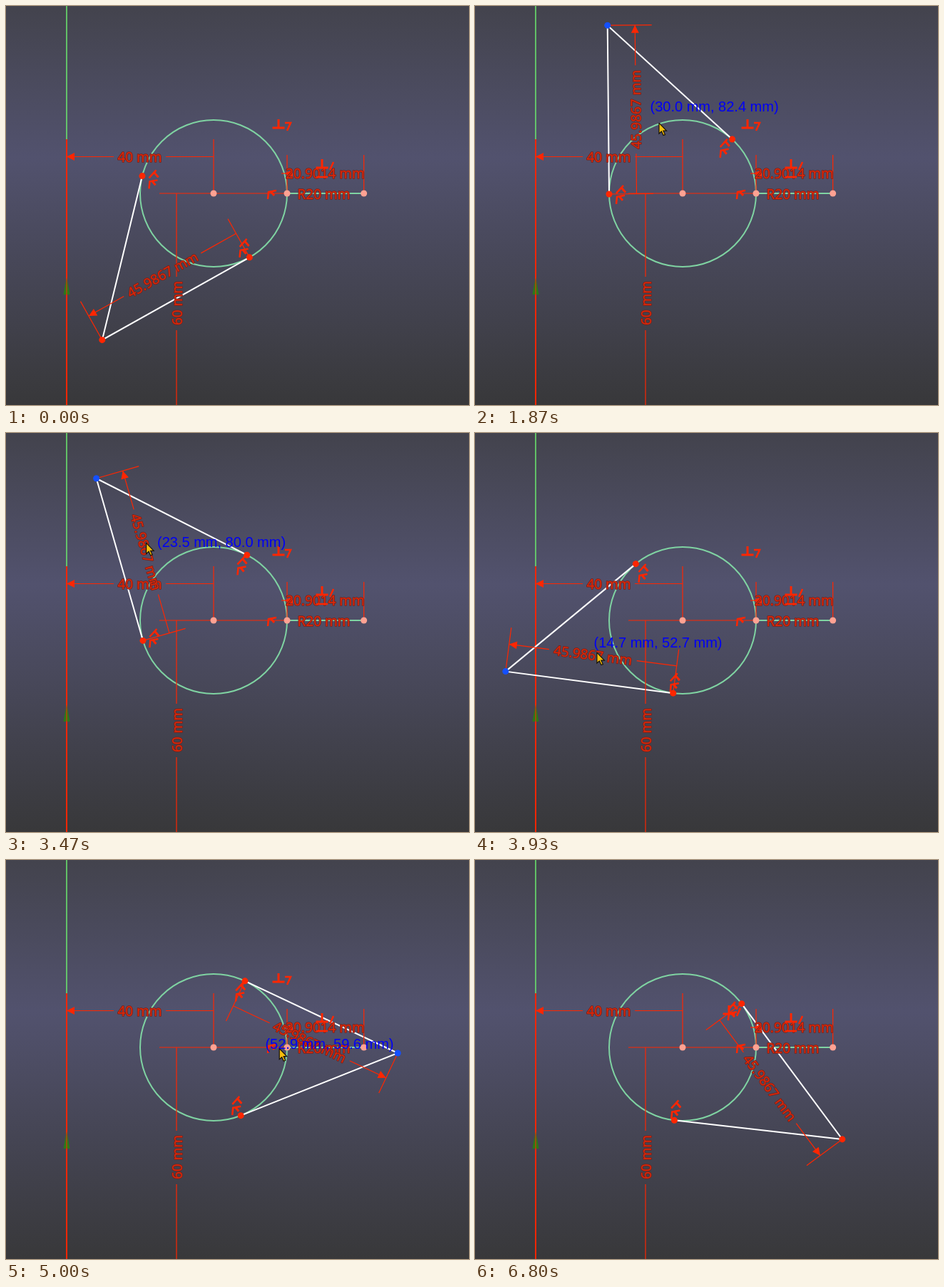
These frames come from a looping animation (649 px wide and 560 px high, 7390 ms). An HTML page with a canvas:

```html
<!DOCTYPE html>
<html>
<head>
<meta charset="utf-8">
<style>
html, body { margin: 0; width: 100%; height: 100%; overflow: hidden; background: #444450; }
canvas { display: block; }
</style>
</head>
<body>
<canvas id="stage" width="649" height="560"></canvas>
<script>
const ctx = document.getElementById('stage').getContext('2d');
const LOOP = 7390, STEP = 1000 / 15, LAST = 102;
const RED = '#ff2600', GREEN = '#7fd3a2', PINK = '#ffa293';
const SCALE = 5.15, ORIGIN = { x: 85, y: 572 };
const toX = mm => ORIGIN.x + mm * SCALE, toY = mm => ORIGIN.y - mm * SCALE;
const C = { x: toX(40), y: toY(60) }, R = 20 * SCALE, LEN = 45.9867 * SCALE;
const HALF = Math.atan2(LEN, R), DIST = Math.hypot(LEN, R);
const EDGE = C.x + R, TIP = EDGE + 20.9014 * SCALE;

// Turning points of the mouse in mm: step, x, y, steps at rest
const TURNS = [
  [0, 9.7, 20.1], [7, 74.8, 60], [12, 17.5, 19.7, 4], [22, 7, 66], [28, 30, 82.4],
  [30, 45.3, 57.6], [34, 39.9, 19.7], [38, 22.8, 83, 4], [47, 41.8, 19.7],
  [52, 23.5, 80], [57, 8.8, 58.5], [66, 50, 40], [69, 65.4, 59.3], [72, 16.6, 59],
  [76, 59.8, 59.7, 2], [81, 18.5, 69.2], [85, 80, 60], [89, 16.6, 26.5, 5],
  [LAST, 83.4, 35]
];
const PATH = TURNS.flatMap(([n, x, y, rest]) => {
  const key = { n, x: toX(x), y: toY(y) };
  return rest ? [key, { ...key, n: n + rest }] : [key];
});

function slope(i, axis) {
  const a = PATH[i - 1], b = PATH[i], c = PATH[i + 1];
  if (!a || !c || a[axis] === b[axis] || b[axis] === c[axis]) return 0;
  return (c[axis] - a[axis]) / (c.n - a.n);
}

// Smooth curve through the turning points
function mouseAt(n) {
  const i = PATH.findIndex(k => k.n > n);
  if (i < 0) return PATH.at(-1);
  const a = PATH[i - 1], b = PATH[i], span = b.n - a.n, u = (n - a.n) / span;
  const ease = u * u * (3 - 2 * u);
  const value = axis => a[axis] + (b[axis] - a[axis]) * ease
    + span * u * (1 - u) * ((1 - u) * slope(i - 1, axis) - u * slope(i, axis));
  return { x: value('x'), y: value('y') };
}

const polar = (a, r, from = C) => ({ x: from.x + r * Math.cos(a), y: from.y + r * Math.sin(a) });

function stroke(color, width, ...pts) {
  ctx.strokeStyle = color;
  ctx.lineWidth = width;
  ctx.beginPath();
  for (let i = 0; i < pts.length; i += 2) ctx.lineTo(pts[i], pts[i + 1]);
  ctx.stroke();
}

function fill(color, ...pts) {
  ctx.fillStyle = color;
  ctx.beginPath();
  for (let i = 0; i < pts.length; i += 2) ctx.lineTo(pts[i], pts[i + 1]);
  ctx.closePath();
  ctx.fill();
}

function dot(p, color) {
  ctx.fillStyle = color;
  ctx.beginPath();
  ctx.arc(p.x, p.y, 4.5, 0, 7);
  ctx.fill();
}

function at(p, angle, draw) {
  ctx.save();
  ctx.translate(p.x, p.y);
  ctx.rotate(angle);
  draw();
  ctx.restore();
}

function label(text, x, y, angle = 0) {
  at({ x, y }, angle, () => {
    ctx.font = '19px "Noto Sans", "Open Sans", sans-serif';
    ctx.textAlign = 'center';
    ctx.textBaseline = 'alphabetic';
    ctx.lineJoin = 'round';
    ctx.lineWidth = 1.6;
    ctx.strokeStyle = '#7a2018';
    ctx.strokeText(text, 0, 7);
    ctx.fillStyle = '#dc280a';
    ctx.fillText(text, 0, 7);
  });
}

const line = (...pts) => stroke(RED, 1.2, ...pts);
const arrow = (p, angle) => at(p, angle, () => fill(RED, 0, 0, -11, -5.5, -11, 5.5));

function hook(x, y) {
  stroke(RED, 2.5, x - 5, y + 8, x - 4, y - 2, x + 7, y - 4);
  stroke(RED, 3, x - 1, y - 3, x + 4, y + 3);
}

function tangentIcon(a) {
  const { x, y } = polar(a, R - 16);
  hook(x - 1, y + 6);
  stroke(RED, 2.5, x - 6, y - 1, x + 4, y - 12);
  stroke(RED, 3, x + 1, y - 9, x + 7, y - 2);
}

function perpIcon(x, y, seven) {
  stroke(RED, 3, x, y - 12, x, y);
  stroke(RED, 3, x - 8.5, y, x + 8.5, y);
  if (seven) stroke(RED, 2.5, x + 9, y - 7, x + 17, y - 7, x + 12, y + 4);
  else stroke(RED, 2.5, x + 16, y - 8, x + 11, y + 3);
}

function background() {
  const g = ctx.createLinearGradient(0, 0, 0, 560);
  g.addColorStop(0, '#43434d');
  g.addColorStop(0.38, '#52526e');
  g.addColorStop(1, '#38383a');
  ctx.fillStyle = g;
  ctx.fillRect(0, 0, 649, 560);
}

function sketch() {
  const x = ORIGIN.x;
  stroke('#69e06c', 1.6, x, 0, x, 187);
  stroke(RED, 2, x, 187, x, 560);
  fill('#2c7a17', x, 380, x - 4.5, 405, x + 4.5, 405);
  stroke(RED, 1, x, 380, x, 405);
  ctx.strokeStyle = GREEN;
  ctx.lineWidth = 2;
  ctx.beginPath();
  ctx.arc(C.x, C.y, R, 0, 7);
  ctx.stroke();
  stroke(GREEN, 2, EDGE, C.y, TIP, C.y);
}

function fixedDims(released) {
  line(ORIGIN.x, 211.5, 151, 211.5);
  line(224, 211.5, C.x, 211.5);
  line(C.x, 187, C.x, C.y);
  arrow({ x: ORIGIN.x, y: 211.5 }, Math.PI);
  label('40 mm', 187.5, 212);

  line(215, C.y, EDGE, C.y);
  line(239, C.y, 239, 380);
  line(239, 455, 239, 560);
  label('60 mm', 239.5, 417, -Math.PI / 2);
  label('R20 mm', 445.5, 264);

  line(EDGE, 209, EDGE, C.y);
  line(TIP, 209, TIP, C.y);
  line(386, 235, EDGE, 235);
  arrow({ x: 391, y: 235 }, Math.PI);
  label('20.9014 mm', 447.5, 235);

  hook(372, 263);
  perpIcon(443, 227, false);
  stroke(RED, 2.5, 435, 240, 451, 240);
  if (released) perpIcon(356, 216, false);
  else perpIcon(382, 171, true);
}

function lengthDim(t, p, a) {
  const inward = a + Math.PI, dir = a + Math.PI / 2;
  for (const end of [t, p]) {
    const far = polar(inward, 62, end);
    line(end.x, end.y, far.x, far.y);
  }
  const from = polar(inward, 38.5, t), mid = polar(dir, LEN / 2, from);
  at(mid, dir, () => {
    line(-LEN / 2, 0, -62, 0);
    line(62, 0, LEN / 2, 0);
  });
  arrow(polar(dir, LEN, from), dir);
  // Keep the label readable: counter-clockwise tilt within (-75°, 105°]
  let tilt = -dir;
  while (tilt > Math.PI * 7 / 12) tilt -= Math.PI;
  while (tilt <= -Math.PI * 5 / 12) tilt += Math.PI;
  label('45.9867 mm', mid.x, mid.y, -tilt);
}

function pointer(m, tip) {
  const mm = v => (v / SCALE).toFixed(1) + ' mm';
  ctx.font = '20px "Liberation Sans", Arial, sans-serif';
  ctx.textAlign = 'left';
  ctx.textBaseline = 'alphabetic';
  ctx.fillStyle = '#0000f5';
  ctx.fillText(`(${mm(m.x - ORIGIN.x)}, ${mm(ORIGIN.y - m.y)})`, m.x + 6, m.y);
  at(tip, 0, () => {
    const shape = [0, 0, 0, 15, 3.5, 12, 6, 17.5, 8.5, 16.5, 6, 11, 10.5, 11, 0, 0];
    fill('#f7bd0c', ...shape);
    stroke('#15120a', 1.2, ...shape);
  });
}

function draw(n) {
  const dragging = n > 0 && n < LAST;
  const m = mouseAt(n), angle = Math.atan2(m.y - C.y, m.x - C.x);
  const p = polar(angle, DIST);
  const a = angle - HALF, b = angle + HALF;
  const ta = polar(a, R), tb = polar(b, R);

  background();
  sketch();
  stroke('#fff', 2, ta.x, ta.y, p.x, p.y, tb.x, tb.y);
  fixedDims(n >= LAST);
  lengthDim(ta, p, a);
  for (const x of [C.x, EDGE, TIP]) dot({ x, y: C.y }, PINK);
  dot(ta, RED);
  dot(tb, RED);
  dot(p, dragging ? '#1450ff' : RED);
  tangentIcon(a);
  tangentIcon(b);
  if (dragging) pointer(m, mouseAt(n + 0.5));
}

function frame() {
  draw(Math.floor((performance.now() % LOOP + 4) / STEP));
  requestAnimationFrame(frame);
}
frame();
</script>
</body>
</html>
```
